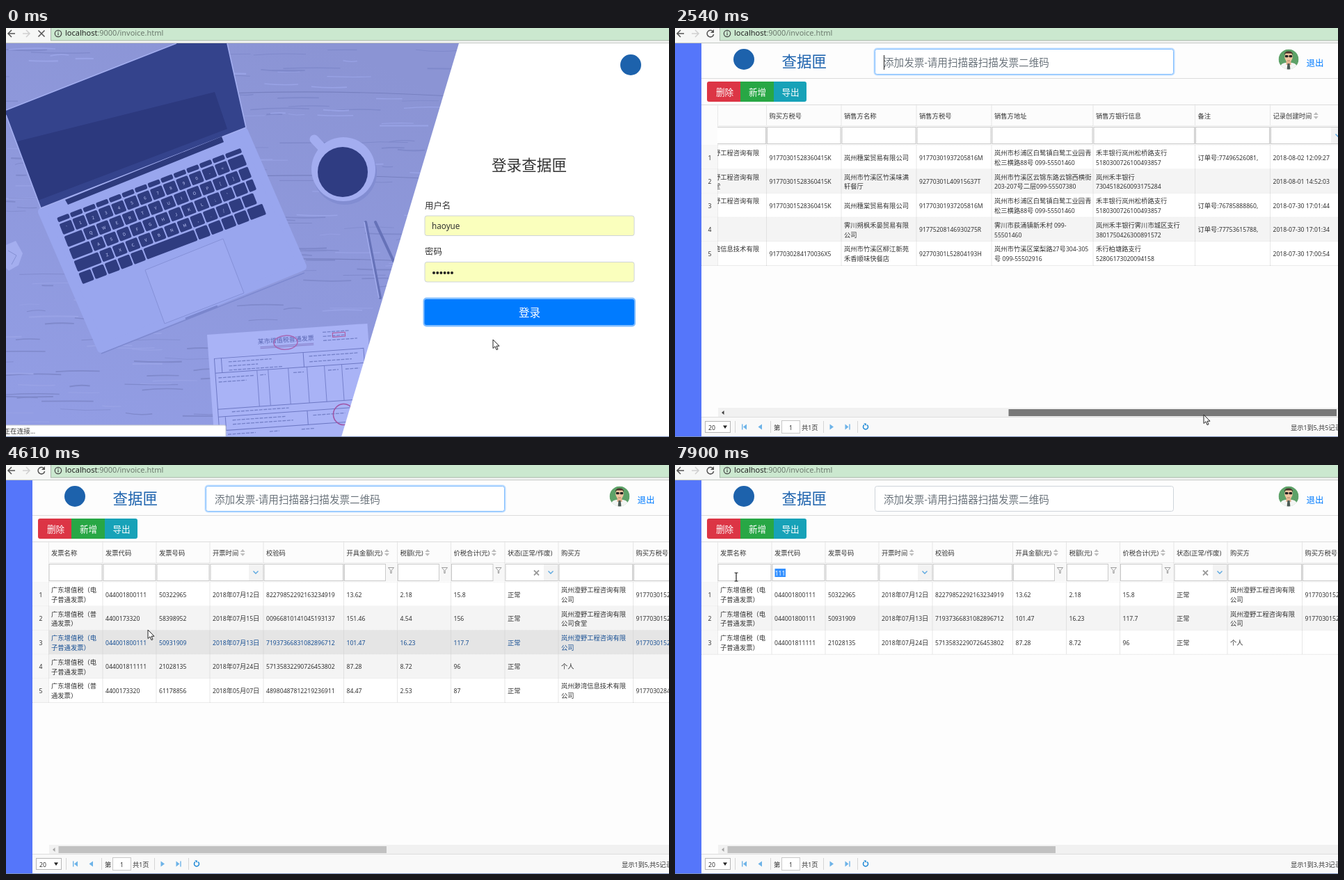
Animation, 953 px wide and 588 px high, one loop 8 s. Source, as an HTML page:

```html
<!DOCTYPE html>
<html lang="zh-CN">
<head>
<meta charset="utf-8">
<title>发票列表</title>
<style>
html, body { margin: 0; width: 100%; height: 100%; overflow: hidden; background: #fff; }
svg { display: block; width: 953px; height: 588px; }
text { font-family: 'Noto Sans CJK SC', 'Noto Sans CJK', 'Noto Sans', sans-serif; fill: #333; white-space: pre; }
.n { font-family: 'Noto Sans', 'Open Sans', sans-serif; font-size: .93em; }
</style>
</head>
<body>
<svg id="stage" viewBox="0 0 953 588" xmlns="http://www.w3.org/2000/svg"></svg>
<script>
const LOOP = 8000, TOP = 168.5, ROW_H = 34.6, MAX_BAR = 404, MAX_SCROLL = 770;

const rect = (x, y, w, h, fill, more = '') =>
  `<rect x="${x}" y="${y}" width="${w}" height="${h}" fill="${fill}" ${more}/>`;
const path = (d, fill, more = '') => `<path d="${d}" fill="${fill}" ${more}/>`;
const line = (d, color, w = 1, more = '') => path(d, 'none', `stroke="${color}" stroke-width="${w}" ${more}`);
const circle = (x, y, r, fill, more = '') => `<circle cx="${x}" cy="${y}" r="${r}" fill="${fill}" ${more}/>`;
const group = (id, body, more = '') => `<g id="${id}" ${more}>${body}</g>`;
// cy is the vertical middle of the glyphs; Latin runs use a narrower face.
const text = (x, cy, s, size = 9.3, more = '') =>
  `<text x="${x}" y="${cy + size * .38}" font-size="${size}" ${more}>` +
  s.replace(/[\x20-\x7e]+/g, m => `<tspan class="n">${m}</tspan>`) + '</text>';
const ink = c => `style="fill:${c}"`;
const mid = 'text-anchor="middle"';

function seeded(seed) {
  return () => (seed = seed * 16807 % 2147483647) / 2147483647;
}

// --- browser chrome ---
function chrome() {
  return rect(0, 0, 953, 22, '#f6f7f6') +
    rect(64.5, -4, 900, 22, '#cbe8cf', 'stroke="#a9b5aa"') +
    line('M0 21.5H953', '#c2c6c2') +
    line('M13 8H3M8 3L3 8L8 13', '#555', 1.5) +
    line('M24 8H34M29 3L34 8L29 13', '#d0d0d0', 1.5) +
    group('stop', line('M46.5 3.5L55.5 12.5M55.5 3.5L46.5 12.5', '#555', 1.5)) +
    group('reload', line('M54.6 5A4.8 4.8 0 1 0 55.6 9', '#555', 1.5) + path('M56 2V7H51Z', '#555')) +
    circle(75, 8, 4.7, 'none', 'stroke="#444" stroke-width="1.2"') +
    line('M75 7.3V10.6M75 5V6.2', '#444', 1.2) +
    `<text x="85" y="11.4" font-size="11.8"><tspan class="n" fill="#222">localhost</tspan>` +
    `<tspan class="n" fill="#6c7a6e">:9000/invoice.html</tspan></text>`;
}

// --- login page ---
function keyboard() {
  const rows = ['', '`1234567890-=', ' QWERTYUIOP[]', ' ASDFGHJKL;\' ', ' ZXCVBNM,./  ', ''];
  const width = 283, pitch = 19.8;
  let s = '', y = 0;
  rows.forEach((keys, r) => {
    const h = r ? 18.6 : 9, shift = [0, 0, 9, 13, 19, 0][r];
    for (let i = 0; i < 14; i++) {
      if (r == 5 && i > 4 && i < 9) continue;
      const x = i ? i * pitch + shift : 0;
      const right = i == 13 ? width : Math.min((i + 1) * pitch + shift, width);
      if (x > width - 8) continue;
      s += rect(x, y, right - x - 2, h - 2, '#2f3c80', 'rx="2"');
      if (keys[i] && keys[i] != ' ')
        s += `<text x="${x + 9}" y="${y + 11}" font-size="6" ${mid} ${ink('#c3cbfa')}>${keys[i]}</text>`;
    }
    if (r == 5) s += rect(5 * pitch, y, 4 * pitch - 2, h - 2, '#2f3c80', 'rx="2"');
    y += h + .6;
  });
  return `<g transform="matrix(.939 -.357 .362 .924 73 273)">${s}</g>`;
}

function invoice() {
  const c = '#6d78c4';
  let s = rect(0, 0, 231, 170, '#a9b3f6') +
    text(72, 15, '某市增值税普通发票', 9, ink('#5a66b2')) +
    line('M75 23H152M75 25H152', '#7d72bd', .8) +
    rect(8, 35, 215, 104, 'none', `stroke="${c}"`) +
    line('M8 56H223M8 108H223M8 119H223M18 35V56M18 119V139M136 35V56M136 119V139', c) +
    line('M68 56V108M84 56V108M113 56V108M140 56V108M165 56V108M190 56V108', c, .8) +
    line('M166 8H204M166 14H198M166 20H215M28 41H90M28 47H70M28 53H105M144 41H215M144 49H205' +
      'M12 63H64M12 69H52M72 63H80M120 63H135M170 63H185M195 63H215M28 113H110M28 125H104M28 131H115M144 126H190' +
      'M20 145H60M80 145H94M126 145H145', '#7480c8', 1.3, 'stroke-dasharray="5 1.5"') +
    `<ellipse cx="112" cy="19" rx="17" ry="10" fill="none" stroke="#a767b5" stroke-width="1.5"/>` +
    rect(180, 10, 18, 6, 'none', 'stroke="#b0549a"') +
    circle(188, 128, 15, 'none', 'stroke="#a054a5" stroke-width="1.5"');
  return `<g transform="translate(289 441) rotate(-4)">${s}</g>`;
}

function photo() {
  const rnd = seeded(41);
  let s = rect(0, 22, 660, 566, 'url(#wood)');
  for (let i = 0; i < 260; i++) {
    const x = rnd() * 660 - 30, y = 24 + rnd() * 560, w = 15 + rnd() * 70, b = (rnd() - .5) * 8;
    s += line(`M${x} ${y}q${w / 2} ${b} ${w} ${b / 3}`, rnd() < .6 ? '#7f89cb' : '#99a3e6', .6 + rnd() * 1.6);
  }
  for (const y of [95, 215, 335, 455]) s += line(`M300 ${y}Q450 ${y - 8} 660 ${y + 4}`, '#7780c0', 1.2);
  return s +
    path('M52 264L342 149L426 343L137 461Z', '#99a6ee', 'stroke="#99a6ee" stroke-width="12" stroke-linejoin="round"') +
    line('M429 352L137 468', '#7d89d0', 1.5) +
    path('M0 118L245 22H318L345 143L50 259L0 125Z', '#34438c') +
    path('M16 163L300 92L318 145L46 248Z', '#2c397e') +
    line('M0 118L245 22M318 22L345 143L50 259L0 125', '#a3aef0', 1.6) +
    path('M85 247L310 156L313 164L89 254Z', '#2d3a7d') +
    keyboard() +
    path('M200 348L312 303L342 381L228 425Z', '#9da9f0', 'stroke="#8591d8"') +
    line('M258 418L304 400', '#7a86cd', 3) +
    line('M443 160L462 180', '#a3adf0', 13, 'stroke-linecap="round"') +
    circle(487, 208, 46, '#828dd2') +
    circle(485, 203, 46, '#a3adf0') +
    circle(484, 207, 36, '#2f3c82') +
    line('M517 279L538 388M531 279L557 335', '#6672b8', 4, 'stroke-linecap="round"') +
    line('M515 279L536 388', '#a1abec', 1.5) +
    path('M0 312L14 306L24 324L18 341L4 349L0 345Z', '#a4aeef') + line('M3 320L15 327L8 340', '#8490d3') +
    invoice() +
    path('M651 22H953V588H482Z', '#fff');
}

function login() {
  const field = y => rect(602, y, 301, 28.5, '#faffbd', 'rx="3" stroke="#ced4da"');
  let dots = '';
  for (let i = 0; i < 6; i++) dots += circle(615 + i * 5.2, 352, 2, '#222');
  return photo() + circle(898, 53, 15, '#1d62ac') +
    text(698, 197, '登录查据匣', 21.6) +
    text(602, 255, '用户名', 12.4) + field(270) + text(612, 284.5, 'haoyue', 12.6) +
    text(602, 321, '密码', 12.4) + field(336.5) + dots +
    rect(599.5, 387.5, 305.5, 42, '#80bdff', 'rx="5"') +
    rect(601.5, 390, 301.5, 37, '#007bff', 'rx="3"') +
    text(752.5, 409, '登录', 15.6, mid + ' ' + ink('#fff'));
}

// --- invoice table ---
const cols = [
  [61, '发票名称'], [139, '发票代码'], [216, '发票号码'], [293, '开票时间', 'date', 1], [370, '校验码'],
  [485.5, '开具金额(元)', 'num', 1], [562.5, '税额(元)', 'num', 1], [639.5, '价税合计(元)', 'num', 1],
  [717, '状态(正常/作废)', 'state'], [794, '购买方'], [901.5, '购买方税号'], [1009, '销售方名称'],
  [1117, '销售方税号'], [1225, '销售方地址'], [1371, '销售方银行信息'], [1517.5, '备注'],
  [1625.5, '记录创建时间', 'date', 1], [1734, '']
];
const eType = '广东增值税（电|子普通发票）', pType = '广东增值税（普|通发票）';
const buyer = '岚州澄野工程咨询有限|公司', buyerTax = '91770301528360415K';
const seller = '岚州穗棠贸易有限公司', sellerTax = '91770301937205816M';
const address = '岚州市杉浦区白鹭镇白鹭工业园青|松三横路88号 099-55501460';
const bank = '禾丰银行岚州松桥路支行|5180300726100493857';
const rows = [
  [eType, '044001800111', '50322965', '2018年07月12日', '82279852292163234919', '13.62', '2.18', '15.8', '正常',
    buyer, buyerTax, seller, sellerTax, address, bank, '订单号:77496526081,', '2018-08-02 12:09:27'],
  [pType, '4400173320', '58398952', '2018年07月15日', '00966810141045193137', '151.46', '4.54', '156', '正常',
    buyer + '食堂', buyerTax, '岚州市竹溪区竹溪味满|轩餐厅', '92770301L40915637T',
    '岚州市竹溪区云锦东路云锦西横街|203-207号二层099-55507380', '岚州禾丰银行|7304518260093175284', '', '2018-08-01 14:52:03'],
  [eType, '044001800111', '50931909', '2018年07月13日', '71937366831082896712', '101.47', '16.23', '117.7', '正常',
    buyer, buyerTax, seller, sellerTax, address, bank, '订单号:76785888860,', '2018-07-30 17:01:44'],
  [eType, '044001811111', '21028135', '2018年07月24日', '57135832290726453802', '87.28', '8.72', '96', '正常',
    '个人', '', '霁川朔枫禾晏贸易有限|公司', '91775208146930275R',
    '霁川市荻涌镇新禾村 099-|55501460', '岚州禾丰银行霁川市城区支行|3801750426300891572', '订单号:77753615788,', '2018-07-30 17:01:34'],
  [pType, '4400173320', '61178856', '2018年05月07日', '48980487812219236911', '84.47', '2.53', '87', '正常',
    '岚州渺湾信息技术有限|公司', '9177030284170036X5', '岚州市竹溪区柳江新苑|禾香顺味快餐店', '92770301L52804193H',
    '岚州市竹溪区棠梨路27号304-305|号 099-55502916', '禾行柏塘路支行|52806173020094158', '', '2018-07-30 17:00:54']
];

const chevron = x => line(`M${x - 3.5} 152.5l3.5 3.5l3.5 -3.5`, '#5aa7e0', 1.4);

function header() {
  let s = '';
  cols.slice(0, -1).forEach(([x, title, kind, sort], i) => {
    const w = cols[i + 1][0] - x;
    s += text(x + 4, 126, title);
    if (sort) {
      const wide = [...title].reduce((a, c) => a + (c < '~' ? 2.7 : 9.3), 0), sx = x + 10 + wide;
      s += path(`M${sx - 3.5} 125l3.5 -4l3.5 4ZM${sx - 3.5} 127l3.5 4l3.5 -4Z`, '#bdbdbd');
    }
    const fw = kind == 'num' ? w - 17 : w - 1;
    s += rect(x + 1, 142.5, fw - 1, 24, '#fff', 'stroke="#c9c9c9"');
    if (kind == 'num') {
      s += rect(x + w - 16, 142, 15, 25, '#f7f7f7') +
        line(`M${x + w - 13} 147.5h8l-3.3 4v4h-1.4v-4Z`, '#888', .8);
    } else if (kind) {
      s += rect(x + w - 21, 143, 20, 23, '#f3f3f3') + chevron(x + w - 11);
      if (kind == 'state') s += line(`M${x + 42} 151.5l7 7m0 -7l-7 7`, '#999', 1.8);
    }
    s += line(`M${x + w} 110V168`, '#cfcfcf', 1, 'stroke-dasharray="1 1"');
  });
  return s;
}

function cells(list, hover) {
  let s = '';
  list.forEach((row, r) => {
    const y = TOP + r * ROW_H;
    row.forEach((cell, c) => {
      const x = cols[c][0] + 4, parts = cell.split('|'), more = r == hover ? ink('#174f93') : '';
      parts.forEach((p, i) => { s += text(x, y + (parts.length > 1 ? 11 + i * 13.8 : 17.5), p, 9.3, more); });
    });
  });
  for (const [x] of cols.slice(1))
    s += line(`M${x} ${TOP}V${TOP + list.length * ROW_H}`, '#cfcfcf', 1, 'stroke-dasharray="1 1"');
  return s;
}

function stripes(list, hover) {
  let s = '';
  list.forEach((_, r) => {
    const y = TOP + r * ROW_H;
    s += rect(38, y, 915, ROW_H, r == hover ? '#e5e5e5' : r % 2 ? '#f4f4f4' : '#fff') +
      rect(38, y, 23, ROW_H, '#f7f7f7') +
      text(50, y + 17.5, String(r + 1), 9.3, mid) +
      line(`M38 ${y + ROW_H}H953`, '#d8d8d8', 1, 'stroke-dasharray="1 1"');
  });
  return s + line(`M61.5 110V${TOP + list.length * ROW_H}`, '#d6d6d6', 1, 'stroke-dasharray="1 1"');
}

function avatar() {
  return `<g clip-path="url(#face)">` + circle(882, 45, 14.5, '#5da268') +
    path('M869 60Q869 51 877 50H887Q895 51 895 60Z', '#f3f5f3') +
    rect(878.5, 45, 7, 8, '#e3b48f') + path('M880.5 51h3l1 9h-5Z', '#4b5a55') +
    `<ellipse cx="882" cy="41.5" rx="5.8" ry="7" fill="#efc6a0"/>` +
    path('M876 39Q875.5 33.5 882 33.5Q888.5 33.5 888 39L886.5 36.5H877.5Z', '#4b342c') +
    rect(876.8, 39, 4.7, 3.2, '#222', 'rx="1.3"') + rect(882.5, 39, 4.7, 3.2, '#222', 'rx="1.3"') +
    line('M880 47h4', '#b0775d') + '</g>';
}

function footer() {
  const blue = '#6db3e8';
  return rect(38, 559, 915, 29, '#f9f9f9') + line('M38 559.5H953', '#dedede') +
    rect(43.5, 565.5, 36, 16, '#fff', 'stroke="#b5b5b5"') + text(48, 574, '20') + path('M69 571.5h6l-3 4.5Z', '#222') +
    line('M86.5 565V582M137.5 565V582M213.5 565V582M262.5 565V582', '#d5d5d5') +
    path('M103 569.5v8l-5 -4ZM125 569.5v8l-5.5 -4ZM222.5 569.5v8l5.5 -4ZM244.5 569.5v8l5 -4Z', blue) +
    line('M96.7 569.5v8M251 569.5v8', blue, 1.4) +
    text(142, 574, '第') + rect(153.5, 564.5, 26, 18, '#fff', 'stroke="#c9c9c9"') + text(166.5, 574, '1', 9.3, mid) +
    text(182, 574, '共1页') +
    line('M276 570.6A3.5 3.5 0 1 1 272 570.6', '#1b87d6', 1.5) + path('M271.2 568.6h3.6v3.4Z', '#1b87d6') +
    group('total', '');
}

function app() {
  const button = (x, label, fill, d) => path(d, fill) + text(x, 92, label, 12.6, mid + ' ' + ink('#fff'));
  return rect(0, 22, 953, 566, '#fdfdfd') + rect(0, 22, 38, 566, '#5576fa') +
    circle(99, 45, 15, '#1d62ac') +
    text(153.5, 48, '查据匣', 21.5, ink('#1c62ad')) +
    group('glow', rect(285.5, 28.5, 433, 40, '#bfdeff', 'rx="5"')) +
    `<rect id="search" x="287.5" y="30.5" width="429" height="36" rx="3" fill="#fff"/>` +
    text(300, 49.5, '添加发票-请用扫描器扫描发票二维码', 14.6, ink('#6c757d')) +
    group('caret', line('M300.5 39V60', '#222')) +
    avatar() + text(907.5, 50.5, '退出', 12.5, ink('#007bff')) +
    line('M38 72.5H953', '#dcdcdc') +
    button(71.5, '删除', '#dc3545', 'M94 77H49Q46 77 46 80V103Q46 106 49 106H94Z') +
    button(118.5, '新增', '#28a745', 'M94 77H142V106H94Z') +
    button(166, '导出', '#17a2b8', 'M142 77H186Q189 77 189 80V103Q189 106 186 106H142Z') +
    rect(38, 110, 915, 58, '#fcfcfc') + line('M38 110.5H953', '#dcdcdc') +
    line('M61 140.5H953M38 168.5H953', '#dcdcdc', 1, 'stroke-dasharray="1 1"') +
    group('stripes', '') +
    `<g clip-path="url(#view)">` + group('sheet', header() + group('cells', '') + group('query', '')) + '</g>' +
    rect(62, 546, 891, 13, '#f1f1f1') + path('M70.5 550v6l-3.5 -3Z', '#505050', 'id="left"') +
    rect(75.5, 548, 471.5, 10, '#c1c1c1', 'id="thumb"') + footer();
}

const stage = document.getElementById('stage');
stage.innerHTML =
  `<defs><clipPath id="view">${rect(61, 110, 892, 440, '#000')}</clipPath>` +
  `<clipPath id="face">${circle(882, 45, 14.5, '#000')}</clipPath>` +
  `<linearGradient id="wood" x1=".7" y1="0" x2=".2" y2="1">` +
  `<stop offset="0" stop-color="#8b94d4"/><stop offset="1" stop-color="#929de4"/></linearGradient></defs>` +
  group('app', app()) + group('login', login()) +
  group('status', rect(-2, 571, 318, 20, '#fff', 'stroke="#c4c8d0" rx="2"') + text(-3.5, 579.5, '正在连接...', 9.6)) +
  chrome() + line('M0 587.5H953', '#7d92bd') +
  group('arrow', path('M0 0V12.5L3 9.8L5 14.6L7 13.8L5 9.2H9Z', '#fff', 'stroke="#222"')) +
  group('beam', line('M-2.5 -6H-.7L0 -5.3L.7 -6H2.5M0 -5.3V5.3M-2.5 6H-.7L0 5.3L.7 6H2.5', '#222', 1.2));

const $ = {};
stage.querySelectorAll('[id]').forEach(e => $[e.id] = e);
const show = (id, on) => $[id].setAttribute('display', on ? 'inline' : 'none');
const move = (id, x, y = 0) => $[id].setAttribute('transform', `translate(${x} ${y})`);

const pointer = [
  [0, 700, 448], [680, 690, 455], [800, 665, 475], [920, 620, 500], [1070, 466, 535], [1220, 425, 550],
  [1370, 415, 545], [1640, 470, 549], [1760, 540, 550], [1910, 650, 551], [2030, 740, 552], [2150, 844, 553],
  [2420, 800, 555], [2540, 760, 556], [2690, 720, 556], [2810, 620, 556], [2960, 520, 557], [3110, 450, 558],
  [3230, 421, 558], [3940, 418, 531], [4210, 380, 450], [4330, 320, 360], [4460, 240, 285], [4610, 204, 237],
  [4730, 190, 215], [4850, 170, 195], [5000, 155, 180], [5240, 145, 172], [5390, 143, 155], [6020, 170, 155],
  [6140, 200, 155], [7630, 97, 163], [7780, 90, 162], [7900, 88, 161]
];
const drag = [[0, 0], [1640, 20], [1760, 90], [1910, 190], [2030, 300], [2150, MAX_BAR], [2690, 360],
  [2810, 250], [2960, 120], [3110, 40], [3230, 10], [3380, 0]];
const at = (keys, t) => keys.findLast(k => k[0] <= t);
const within = (t, a, b) => t >= a && t < b;

function query(t) {
  const s = '1'.repeat(t < 6020 ? 0 : t < 6140 ? 1 : t < 6420 ? 2 : 3);
  if (t >= 7630) return rect(143.5, 149, 15.5, 12, '#3390ff') + text(143.7, 155, s, 9.3, ink('#fff'));
  const on = t >= 5900 && !within(t, 6850, 7380);
  return text(143.7, 155, s) + (on ? line(`M${143.5 + s.length * 5} 149V161`, '#222') : '');
}

let bodyKey, queryKey;
function update(t) {
  const [, x, y] = at(pointer, t), bar = at(drag, t)[1], typing = t >= 5390;
  const list = t < 800 ? [] : t < 7100 ? rows : rows.filter(r => r[1].includes('111'));
  const tip = y + 2, over = Math.floor((tip - TOP) / ROW_H);
  const hover = !typing && over >= 0 && over < list.length ? over : -1;

  show('login', t < 560);
  show('app', t >= 560);
  show('status', t < 1220);
  show('stop', t < 800);
  show('reload', t >= 800);
  show('arrow', !typing);
  show('beam', typing);
  move(typing ? 'beam' : 'arrow', x, y);

  show('glow', t < 5900);
  $.search.setAttribute('stroke', t < 5900 ? '#80bdff' : '#ced4da');
  show('caret', within(t, 560, 1070) || within(t, 1640, 4210) || within(t, 4730, 5240));

  move('sheet', -bar * MAX_SCROLL / MAX_BAR);
  move('thumb', bar);
  $.thumb.setAttribute('fill', within(t, 1490, 3660) ? '#787878' : within(t, 3660, 3940) ? '#a8a8a8' : '#c1c1c1');
  $.left.setAttribute('fill', bar ? '#404040' : '#a3a3a3');

  const key = list.length + ':' + hover;
  if (key != bodyKey) {
    bodyKey = key;
    $.stripes.innerHTML = stripes(list, hover);
    $.cells.innerHTML = cells(list, hover);
    $.total.innerHTML = list.length ? text(885, 574, `显示1到${list.length},共${list.length}记录`) : '';
  }
  const q = query(t);
  if (q != queryKey) $.query.innerHTML = queryKey = q;
}

const start = performance.now();
function frame() {
  update((performance.now() - start) % LOOP);
  requestAnimationFrame(frame);
}
frame();
</script>
</body>
</html>
```
